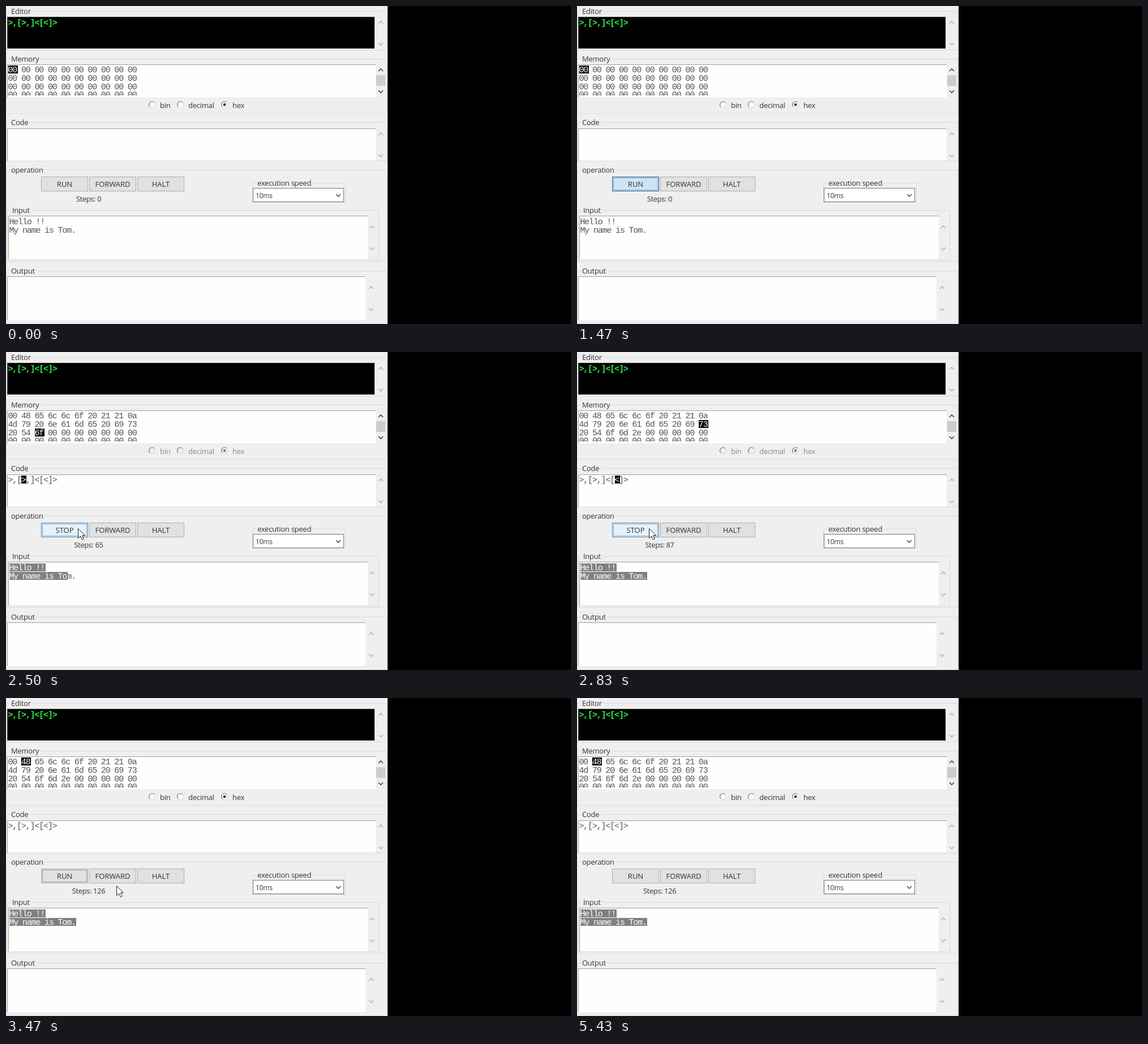
An HTML page with a canvas for the animation above (5490 ms loop, 998x561 px).

```html
<!DOCTYPE html>
<html lang="en">
<head>
<meta charset="utf-8">
<title>Tape machine</title>
<style>
  html, body { margin: 0; width: 100%; height: 100%; overflow: hidden; background: #000; }
  canvas { display: block; }
</style>
</head>
<body>
<canvas id="stage" width="998" height="561"></canvas>
<script>
const ctx = document.getElementById('stage').getContext('2d');
const LOOP = 5490, FRAME = 100 / 3;
const RUN_AT = 1476.2, STEP = 15.5, LAST_STEP = 126;
const PRESS = [1440, 1500], BLUR_AT = 5280;
const PROGRAM = '>,[>,]<[<]>';
const INPUT = 'Hello !!\nMy name is Tom.';
const PANEL = '#efefef', INK = '#333', PAPER = '#fefefc', FADED = '#8a8a8a';
const UI = '"Open Sans", "Noto Sans", sans-serif';
const MONO = '"Liberation Mono", "DejaVu Sans Mono", monospace';
const PITCH = 7.83, LINE = 14.6;

// Pointer paths: [time, x, y]
const PATHS = [
  [[1170, 575, 367], [1330, 127, 311], [1440, 127, 311]],
  [[1500, 127, 311], [2870, 127, 311], [3100, 163, 317], [3150, 163, 317],
   [3330, 190, 331], [3970, 230, 334], [4130, 582, 355], [4400, 582, 355]]
];

function rect(x, y, w, h, fill) {
  ctx.fillStyle = fill;
  ctx.fillRect(x, y, w, h);
}

function frame(x, y, w, h, color) {
  ctx.strokeStyle = color;
  ctx.lineWidth = 1;
  ctx.strokeRect(x + .5, y + .5, w - 1, h - 1);
}

function label(text, x, y, { color = INK, align = 'left', size = 13, gap = -.25 } = {}) {
  ctx.font = `${size}px ${UI}`;
  ctx.letterSpacing = gap + 'px';
  ctx.textAlign = align;
  ctx.fillStyle = color;
  ctx.fillText(text, x, y + 4.7);
}

function mono(text, x, y, color = '#555', weight = '') {
  ctx.font = `${weight} 15px ${MONO}`;
  ctx.letterSpacing = '0px';
  ctx.textAlign = 'center';
  ctx.fillStyle = color;
  [...text].forEach((c, i) => ctx.fillText(c, x + (i + .5) * PITCH, y + 5));
}

function marked(text, x, y, back) {
  rect(Math.round(x), Math.round(y - 7), Math.round(text.length * PITCH) + 1, 14, back);
  mono(text, x, y, '#fff');
}

function group(title, x, y, w, h, textX) {
  frame(x, y, w, h, '#d9d9e6');
  ctx.font = `13px ${UI}`;
  ctx.letterSpacing = '-.25px';
  rect(textX - 2, y - 2, ctx.measureText(title).width + 4, 5, PANEL);
  label(title, textX, y);
}

function chevron(x, y, dir, color, size = 4) {
  ctx.strokeStyle = color;
  ctx.lineWidth = 1.6;
  ctx.beginPath();
  ctx.moveTo(x - size, y - dir * 2);
  ctx.lineTo(x, y + dir * 2);
  ctx.lineTo(x + size, y - dir * 2);
  ctx.stroke();
}

function field(x, y, w, h, barX, { fill = PAPER, edge = '#a0a098', arrow = '#b4b4b4' } = {}) {
  rect(x, y, w, h, edge);
  rect(x + 1, y + 1, w - 1, h - 1, fill);
  const top = y + (h > 70 ? 20 : 10);
  chevron(barX, top, -1, arrow);
  chevron(barX, top + 38, 1, arrow);
}

function radio(text, x, textX, on, enabled) {
  const color = enabled ? INK : FADED;
  ctx.lineWidth = 1.2;
  ctx.beginPath();
  ctx.arc(x, 174, 5.5, 0, 7);
  ctx.fillStyle = enabled ? PAPER : PANEL;
  ctx.fill();
  ctx.strokeStyle = '#d8d8d8';
  ctx.stroke();
  ctx.beginPath();
  ctx.arc(x, 174, 5.5, Math.PI * .75, Math.PI * 1.75);
  ctx.strokeStyle = '#777';
  ctx.stroke();
  if (on) {
    ctx.beginPath();
    ctx.arc(x, 174, 2.2, 0, 7);
    ctx.fillStyle = enabled ? '#000' : '#777';
    ctx.fill();
  }
  label(text, textX, 175, { color });
}

function button(text, x, pointer, pressed, focused) {
  const w = 83, y = 301, h = 26;
  const hover = pointer && pointer.x >= x && pointer.x < x + w && pointer.y >= y && pointer.y < y + h;
  rect(x, y, w, h, pressed ? '#cce4f7' : hover ? '#e5f1fb' : '#e1e1e1');
  frame(x, y, w, h, pressed ? '#1f5f99' : hover ? '#4a8cc8' : '#adadad');
  if (focused) {
    ctx.setLineDash([1, 1]);
    frame(x + 2, y + 2, w - 4, h - 4, '#555');
    ctx.setLineDash([]);
  }
  label(text, x + w / 2, 314, { align: 'center', gap: 0 });
}

// State after a number of steps; pc is the instruction about to run.
function machine(steps) {
  const cells = Array(40).fill(0);
  let ptr = 0, pc = 0, read = 0;
  while (steps-- > 0 && pc < PROGRAM.length) {
    const op = PROGRAM[pc];
    if (op === '>') ptr++;
    if (op === '<') ptr--;
    if (op === ',') cells[ptr] = read < INPUT.length ? INPUT.charCodeAt(read++) : 0;
    if (op === ']' && cells[ptr]) pc = PROGRAM.lastIndexOf('[', pc);
    pc++;
  }
  return { cells, ptr, pc, read };
}

function pointerAt(t) {
  const path = PATHS.find(p => t >= p[0][0] && t < p[p.length - 1][0]);
  if (!path) return null;
  const i = path.findIndex(p => p[0] > t);
  const [t0, x0, y0] = path[i - 1], [t1, x1, y1] = path[i];
  const k = (t - t0) / (t1 - t0), e = k * k * (3 - 2 * k);
  return { x: Math.round(x0 + (x1 - x0) * e), y: Math.round(y0 + (y1 - y0) * e) };
}

function drawPointer({ x, y }) {
  ctx.save();
  ctx.translate(x + .5, y + .5);
  ctx.beginPath();
  [[0, 0], [0, 17], [4, 13.3], [6.8, 19.5], [9.6, 18.3], [7, 12.3], [12, 12]]
    .forEach(([a, b]) => ctx.lineTo(a, b));
  ctx.closePath();
  ctx.fillStyle = '#fff';
  ctx.fill();
  ctx.strokeStyle = '#222';
  ctx.lineWidth = 1;
  ctx.stroke();
  ctx.restore();
}

function drawMemory({ cells, ptr }) {
  field(2, 103, 651, 58, 662, { arrow: '#444' });
  rect(654, 122, 16, 19, '#cdcdcd');
  ctx.save();
  ctx.beginPath();
  ctx.rect(3, 104, 649, 54);
  ctx.clip();
  cells.forEach((v, i) => {
    const text = v.toString(16).padStart(2, '0');
    const x = 4 + i % 10 * PITCH * 3, y = 112.4 + Math.floor(i / 10) * LINE;
    if (i === ptr) marked(text, x, y, '#000');
    else mono(text, x, y);
  });
  ctx.restore();
}

function drawInput(read) {
  field(4, 370, 635, 77, 647);
  let start = 0;
  INPUT.split('\n').forEach((line, i) => {
    const y = 380 + i * LINE;
    const done = Math.max(0, Math.min(line.length, read - start));
    if (done) marked(line.slice(0, done), 6, y, '#808080');
    mono(line.slice(done), 6 + done * PITCH, y);
    start += line.length + 1;
  });
}

function draw(t) {
  const elapsed = (t - RUN_AT) / STEP;
  const stepsAt = e => Math.max(0, Math.min(LAST_STEP, Math.floor(e)));
  const steps = stepsAt(elapsed);
  const shown = stepsAt(elapsed - .2); // the counter repaints slightly after the tape
  const state = machine(steps);
  const started = steps > 0, running = started && steps < LAST_STEP;
  const pointer = pointerAt(t);

  rect(0, 0, 998, 561, '#000');
  rect(0, 0, 674, 561, PANEL);

  group('Editor', 0, 9, 673, 69, 9);
  field(2, 19, 649, 56, 662, { fill: '#000', edge: '#444' });
  mono(PROGRAM, 4, 28.5, '#2cf04a', 'bold');

  group('Memory', 0, 93, 673, 97, 9);
  drawMemory(state);
  radio('bin', 258, 272, false, !running);
  radio('decimal', 308, 322, false, !running);
  radio('hex', 386, 400, true, !running);

  group('Code', 0, 205, 673, 69, 9);
  field(2, 216, 651, 57, 662);
  if (started) {
    mono(PROGRAM, 4, 225);
    if (running) marked(PROGRAM[state.pc], 4 + state.pc * PITCH, 225, '#000');
  }

  group('operation', 0, 289, 673, 162, 9);
  const pressed = t >= PRESS[0] && t < PRESS[1];
  button(running ? 'STOP' : 'RUN', 62, pointer, pressed, t >= PRESS[0] && t < BLUR_AT);
  button('FORWARD', 147, pointer);
  button('HALT', 232, pointer);
  label('Steps: ' + shown, 146, 340, { align: 'center', gap: -.4 });

  group('execution speed', 435, 312, 165, 35, 444);
  rect(437, 322, 160, 24, '#fff');
  frame(436, 321, 161, 25, '#75758c');
  label('10ms', 441, 334.5, { size: 12 });
  chevron(587, 334, 1, '#555');

  group('Input', 2, 360, 657, 88, 11);
  drawInput(state.read);

  group('Output', 0, 467, 673, 94, 9);
  field(2, 477, 633, 77, 645);

  if (pointer) drawPointer(pointer);
}

const origin = performance.now();
function tick() {
  const t = (performance.now() - origin) % LOOP;
  draw(Math.floor((t + 4) / FRAME) * FRAME);
  requestAnimationFrame(tick);
}
tick();
</script>
</body>
</html>
```
